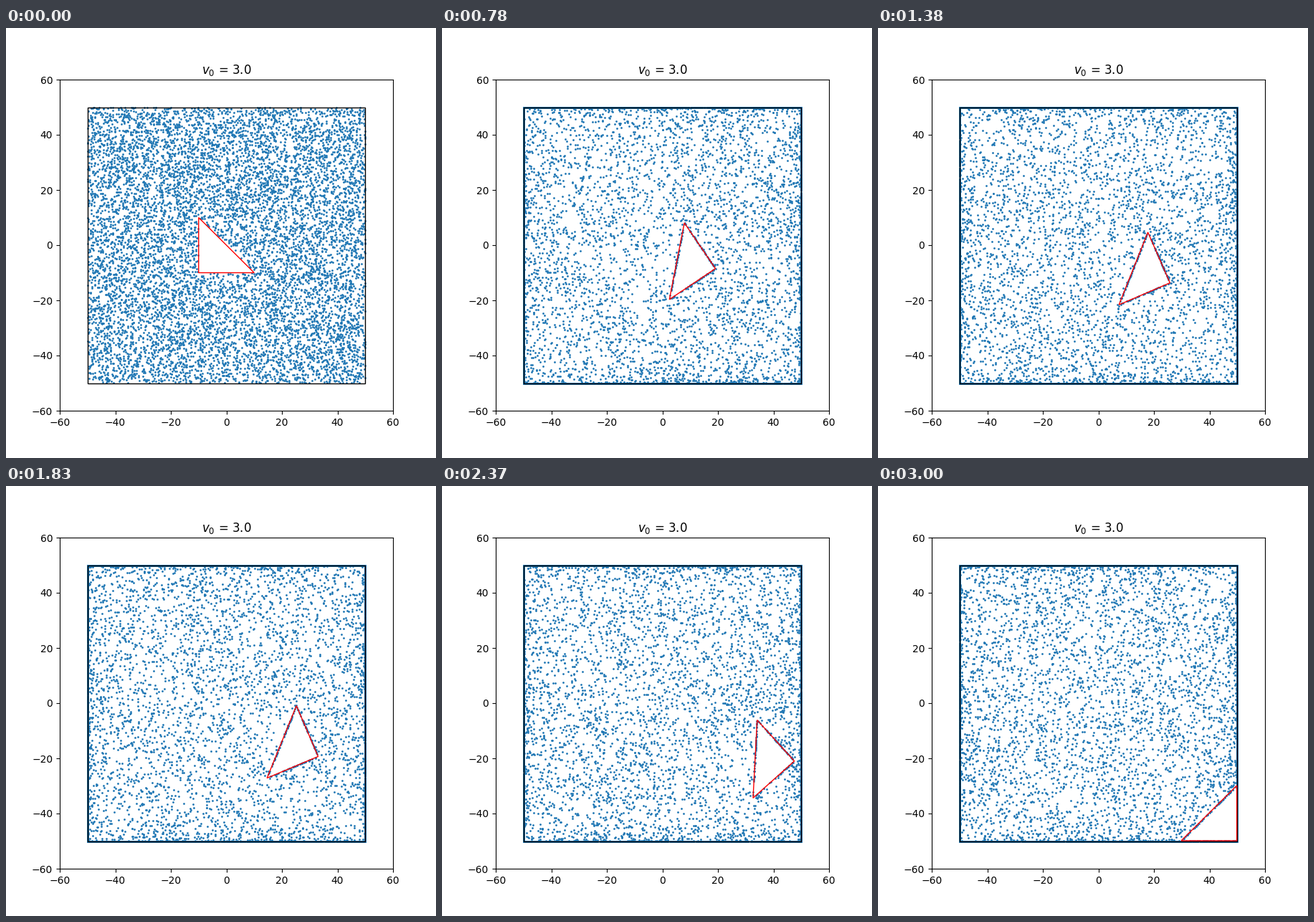
Animation, 600 px wide and 600 px high, one loop 3030 ms. Source, as a matplotlib script:

```python
import numpy as np
import matplotlib.pyplot as plt
from matplotlib.animation import FuncAnimation
from matplotlib.patches import Polygon, Rectangle

FRAMES, INTERVAL = 101, 30
N, HALF, LEG = 10000, 50, 20
GAP = 0.15                        # clearance between wedge and walls
STEP, TURN, SUB = 4.5, 0.125, 4   # path per frame, rotational diffusion, substeps

# Wedge route: time, centroid x, centroid y, heading of the right-angle corner
ROUTE = np.array([
    (0, -3.33, -3.33, 225),
    (15, 4.55, -5.0, 360),
    (26, 9.85, -6.7, 349),
    (46, 17.0, -10.2, 338.4),
    (61, 24.3, -15.8, 338),
    (79, 38.1, -20.5, 357),
    (100, 43.33, -43.33, 315),
])


def tangents(t, y):
    """Slopes of a monotone cubic through the points."""
    d = np.diff(y) / np.diff(t)
    a, b = d[:-1], d[1:]
    same = a * b > 0
    mid = np.where(same, 2 * a * b / np.where(same, a + b, 1), 0)
    return np.concatenate([d[:1], mid, d[-1:]])


TIMES = ROUTE[:, 0]
SLOPES = [tangents(TIMES, col) for col in ROUTE.T[1:]]


def pose(t):
    i = min(np.searchsorted(TIMES, t, side="right") - 1, len(TIMES) - 2)
    h = TIMES[i + 1] - TIMES[i]
    s = (t - TIMES[i]) / h
    out = []
    for y, m in zip(ROUTE.T[1:], SLOPES):
        out.append((2 * s**3 - 3 * s**2 + 1) * y[i] + (s**3 - 2 * s**2 + s) * h * m[i]
                   + (3 * s**2 - 2 * s**3) * y[i + 1] + (s**3 - s**2) * h * m[i + 1])
    return out


def wedge(t):
    """Counter-clockwise corners, kept inside the box."""
    x, y, deg = pose(t)
    r = LEG / np.sqrt(2)
    local = np.array([(2 * r / 3, 0), (-r / 3, r), (-r / 3, -r)])
    c, s = np.cos(np.radians(deg)), np.sin(np.radians(deg))
    pts = local @ np.array([(c, s), (-s, c)]) + (x, y)
    limit = HALF - GAP
    pts -= np.maximum(pts.max(axis=0) - limit, 0)
    pts -= np.minimum(pts.min(axis=0) + limit, 0)
    return pts


def edge_distance(p, tri):
    """Signed distance to each edge (negative inside) and outward normals."""
    e = np.roll(tri, -1, axis=0) - tri
    n = np.column_stack([e[:, 1], -e[:, 0]])
    n /= np.linalg.norm(n, axis=1, keepdims=True)
    return p @ n.T - (tri * n).sum(axis=1), n


def push_out(p, tri):
    d, n = edge_distance(p, tri)
    near = d.argmax(axis=1)
    depth = np.minimum(d.max(axis=1), 0)
    return p - depth[:, None] * n[near]


def simulate():
    rng = np.random.default_rng(7)
    p = rng.uniform(-HALF, HALF, (N, 2))
    p = p[edge_distance(p, wedge(0))[0].max(axis=1) > 0]
    heading = rng.uniform(0, 2 * np.pi, len(p))
    states = [p]
    for k in range(1, FRAMES):
        for j in range(1, SUB + 1):
            heading = heading + rng.normal(0, np.sqrt(2 * TURN / SUB), len(p))
            p = p + STEP / SUB * np.column_stack([np.cos(heading), np.sin(heading)])
            p = push_out(p, wedge(k - 1 + j / SUB))
            p = np.clip(p, -HALF, HALF)
        states.append(p)
    return states


states = simulate()

fig, ax = plt.subplots(figsize=(6, 6), dpi=100)
ax.set_xlim(-60, 60)
ax.set_ylim(-60, 60)
ax.set_title("$v_0$ = 3.0")
dots, = ax.plot([], [], "o", color="tab:blue", ms=1)
ax.add_patch(Rectangle((-HALF, -HALF), 2 * HALF, 2 * HALF, fill=False, ec="black", lw=1, zorder=3))
tri = ax.add_patch(Polygon(wedge(0), closed=True, fill=False, ec="red", lw=1, zorder=4))


def update(k):
    dots.set_data(*states[k].T)
    tri.set_xy(wedge(k))
    return dots, tri


anim = FuncAnimation(fig, update, frames=FRAMES, interval=INTERVAL, repeat=True, repeat_delay=0)
plt.show()
```
